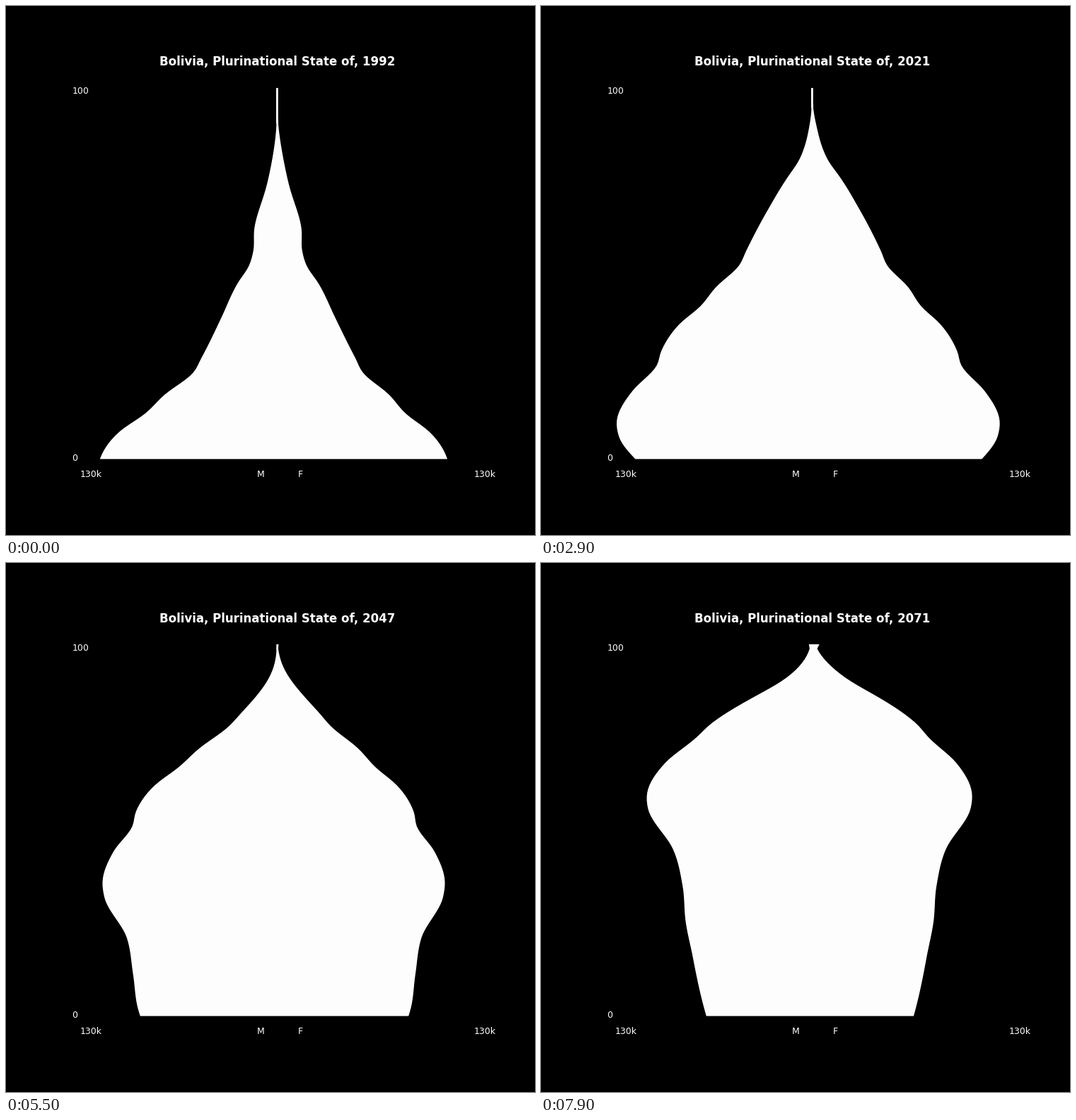
These frames come from a looping animation (748x748 px, 8 s). A matplotlib script:

```python
import numpy as np
import matplotlib.pyplot as plt
from matplotlib.animation import FuncAnimation

SIZE, DPI = 748, 100
START, FRAMES, STEP = 1992, 80, 100
LEFT, RIGHT = 0.125 * SIZE, 0.9 * SIZE
MID = (LEFT + RIGHT) / 2
TYPE = SIZE / 750               # font scale for the stage
LINE = 1.5                      # outline width in points
EDGE = LINE / 2 * DPI / 72
AGES = np.arange(101.0)

# Births per year, as half-widths in pixels
BIRTH_YEARS = np.array([1890, 1918, 1930, 1936, 1940, 1945, 1954, 1965, 1969, 1975, 1980,
                        1985, 1992, 1996, 2003, 2011, 2015, 2026, 2036, 2045, 2055, 2071])
BIRTHS = np.array([25, 27, 41, 40, 46, 64, 87, 114, 124, 161, 184,
                   217, 240, 243, 271, 284, 278, 230, 210, 199, 178, 151])
SLOPES = np.gradient(BIRTHS, BIRTH_YEARS)


def births(year):
    """Cubic Hermite curve through the key years."""
    i = np.clip(np.searchsorted(BIRTH_YEARS, year, side="right") - 1,
                0, len(BIRTHS) - 2)
    h = BIRTH_YEARS[i + 1] - BIRTH_YEARS[i]
    u = (year - BIRTH_YEARS[i]) / h
    v = 1 - u
    return ((1 + 2 * u) * v * v * BIRTHS[i] + (3 - 2 * u) * u * u * BIRTHS[i + 1]
            + u * v * h * (v * SLOPES[i] - u * SLOPES[i + 1]))


def sigmoid(x):
    return 1 / (1 + np.exp(-x))


def widths(year):
    """Male and female half-widths for every age in one year."""
    born = year - AGES
    early = 1 + 0.05 * max(0, 2013 - year) / 21
    leaving = 1 - 0.14 * sigmoid((AGES - 20) / 7)
    # Gompertz mortality that shifts to older ages over time
    hazard = 0.445 * np.exp((AGES - 81 + 0.1 * (2071 - year)) / 9)
    living = births(born) * early * leaving
    male = living * np.exp(-1.08 * hazard)
    female = living * np.exp(-0.87 * hazard) * (0.96 + 0.08 * sigmoid((1974 - born) / 4))
    for side in (male, female):
        side[-1] *= 2           # the last group is "100 and over"
    return np.maximum(male - EDGE, 0), np.maximum(female - EDGE, 0)


fig, ax = plt.subplots(figsize=(SIZE / DPI, SIZE / DPI), dpi=DPI, facecolor="black")
fig.subplots_adjust(left=0.125, right=0.9, bottom=0.11, top=0.88)
ax.set(xlim=(LEFT, RIGHT), ylim=(-5, 105))
ax.axis("off")
shape, = ax.fill([MID, MID, MID], [0, 50, 100], fc="#fdfdfd", ec="white", lw=LINE)


def label(x, y, text, size, **style):
    return ax.text(x, y, text, transform=ax.transAxes, color="white",
                   family="DejaVu Sans", size=size * TYPE, **style)


for x, y, text in [(0, 0.94, "100"), (0, 0.04, "0"), (0.02, 0, "130k"),
                   (0.45, 0, "M"), (0.55, 0, "F"), (0.98, 0, "130k")]:
    label(x, y, text, 9)
title = label(0.5, 1.01, "", 12, weight="bold", ha="center")


def draw(i):
    year = START + i
    male, female = widths(year)
    x = np.concatenate([MID - male, (MID + female)[::-1]])
    shape.set_xy(np.column_stack([x, np.concatenate([AGES, AGES[::-1]])]))
    title.set_text(f"Bolivia, Plurinational State of, {year}")
    return shape, title


anim = FuncAnimation(fig, draw, frames=FRAMES, interval=STEP, repeat=True,
                     repeat_delay=0, blit=False)
plt.show()
```
